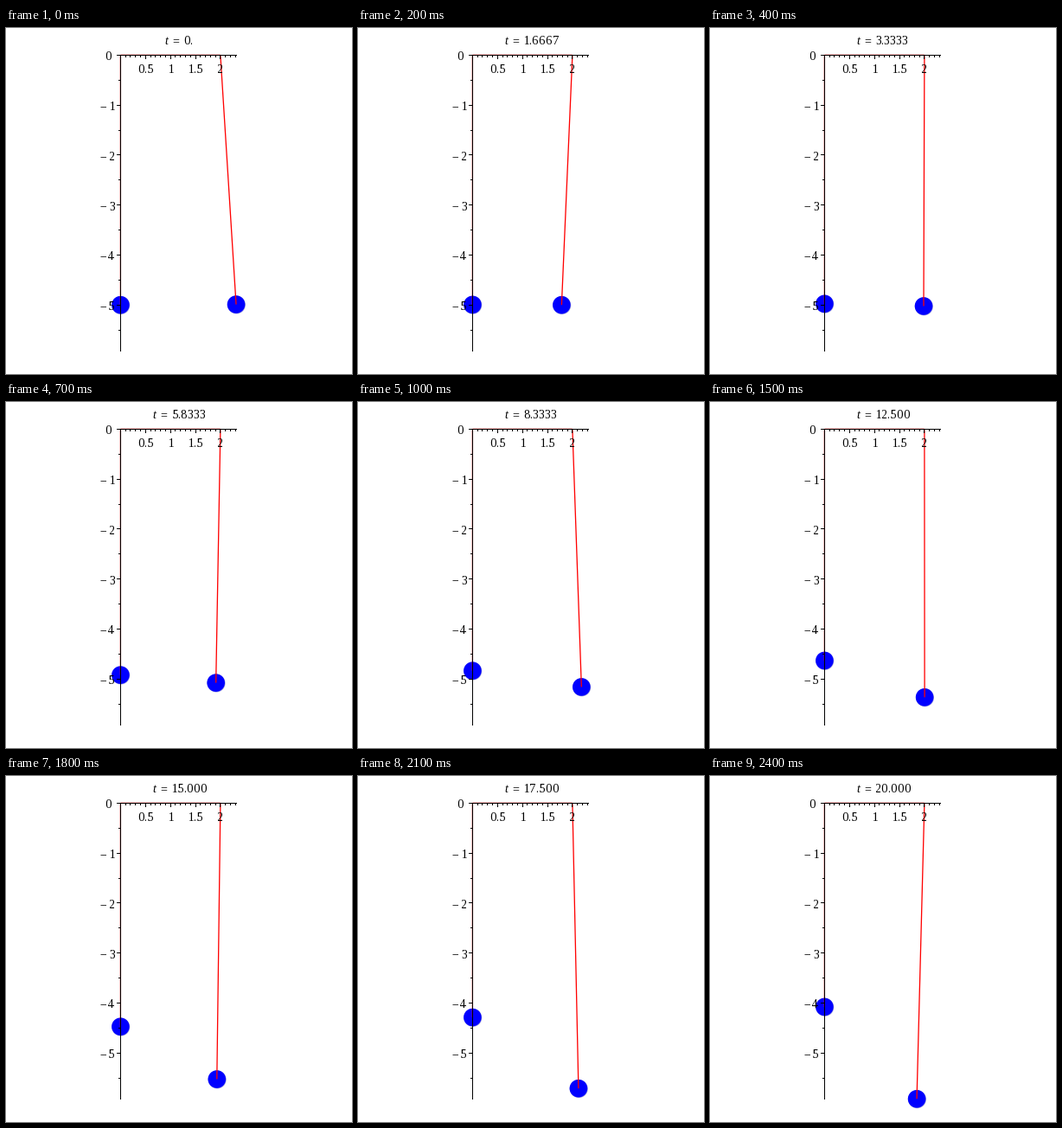
Animation, 400 px wide and 400 px high, one loop 2500 ms. Source, as a matplotlib script:

```python
import numpy as np
import matplotlib.pyplot as plt
from matplotlib.animation import FuncAnimation
from matplotlib.patches import Circle

SIZE, FRAMES, INTERVAL = 400, 25, 100
T_END, G, R0, THETA0 = 20.0, 9.8, 5.0, np.pi / 50
X0, Y0, UNIT = 132.4, 31.4, 57.75   # origin and scale in pixels
PULLEY = 2.0
PT = 0.72                           # points per pixel at 100 dpi

plt.rcParams["font.family"] = "Liberation Serif"
plt.rcParams["text.hinting_factor"] = 1   # whole-pixel letter spacing


def rates(s):
    """Swinging Atwood machine with equal masses: r, r', theta, theta'."""
    r, vr, a, va = s
    return np.array([
        vr,
        (r * va**2 - G * (1 - np.cos(a))) / 2,
        va,
        -(2 * vr * va + G * np.sin(a)) / r,
    ])


def simulate(substeps=50):
    h = T_END / (FRAMES - 1) / substeps
    s = np.array([R0, 0.0, THETA0, 0.0])
    states = [s]
    for _ in range(FRAMES - 1):
        for _ in range(substeps):
            k1 = rates(s)
            k2 = rates(s + h / 2 * k1)
            k3 = rates(s + h / 2 * k2)
            k4 = rates(s + h * k3)
            s = s + h / 6 * (k1 + 2 * k2 + 2 * k3 + k4)
        states.append(s)
    return states


def px(x):
    return X0 + UNIT * x


def py(y):
    return Y0 - UNIT * y


fig = plt.figure(figsize=(SIZE / 100, SIZE / 100), dpi=100, facecolor="white")
ax = fig.add_axes([0, 0, 1, 1])
ax.set_xlim(0, SIZE)
ax.set_ylim(SIZE, 0)
ax.axis("off")


def rule(xs, ys):
    """Crisp one-pixel line that includes both end pixels."""
    ax.plot(np.floor(xs) + 0.5, np.floor(ys) + 0.5, color="black", lw=PT,
            zorder=4, snap=False, solid_capstyle="projecting")


def label(x, y, text="", ha="left", **kw):
    return ax.text(x, y, text, size=14 * PT, ha=ha, va="baseline",
                   zorder=5, **kw)


def disc(radius, color, zorder):
    return ax.add_patch(Circle((0, 0), radius, fc=color, ec="none",
                               zorder=zorder))


states = simulate()
r_end, _, a_end, _ = states[-1]
x_max = PULLEY + R0 * np.sin(THETA0)
y_min = -r_end * np.cos(a_end)

# axes with ticks and labels
rule([X0, px(x_max)], [Y0, Y0])
rule([X0, X0], [Y0, py(y_min)])
for i in range(1, 24):
    x = px(i / 10)
    rule([x, x], [Y0, Y0 + (4 if i % 5 == 0 else 2)])
for i in range(12):
    y = py(-i / 2)
    rule([X0 - (4 if i % 2 == 0 else 2), X0], [y, y])
for v in (0.5, 1, 1.5, 2):
    label(px(v), 52, f"{v:g}", ha="center")
label(122.7, Y0 + 5.9, "0", ha="right")
for v in range(1, 6):
    y = py(-v) + 5.9
    label(116.8, y, "\u2212", ha="right")
    label(126, y, str(v), ha="right")

# moving parts
rims = [disc(10.5, "#a4a4dc", 1) for _ in range(2)]
balls = [disc(10.3, "#0000ff", 2) for _ in range(2)]
string, = ax.plot([], [], color="red", lw=1.3 * PT, zorder=3, snap=False,
                  solid_capstyle="butt", solid_joinstyle="miter")
t_sym = label(0, 19, "t", style="italic")
t_eq = label(0, 19, "=")
t_num = label(0, 19)


def set_title(t):
    text = f"{t:#.5g}".lstrip("0") if t else "0."
    width = 22 + 7 * (len(text) - 1) + 4
    left = 200 - width / 2
    t_sym.set_x(left)
    t_eq.set_x(left + 8.5)
    t_num.set_x(left + 22)
    t_num.set_text(text)


def update(i):
    r, _, a, _ = states[i]
    left = X0, py(r - 2 * R0)
    right = px(PULLEY + r * np.sin(a)), py(-r * np.cos(a))
    for ball, rim, (x, y) in zip(balls, rims, (left, right)):
        ball.center = x, y
        rim.center = x + 0.4, y + 0.4
    string.set_data([left[0], X0, px(PULLEY), right[0]],
                    [left[1], Y0, Y0, right[1]])
    set_title(T_END * i / (FRAMES - 1))
    return *rims, *balls, string, t_sym, t_eq, t_num


anim = FuncAnimation(fig, update, frames=FRAMES, interval=INTERVAL,
                     repeat=True, repeat_delay=0, blit=False)
plt.show()
```
